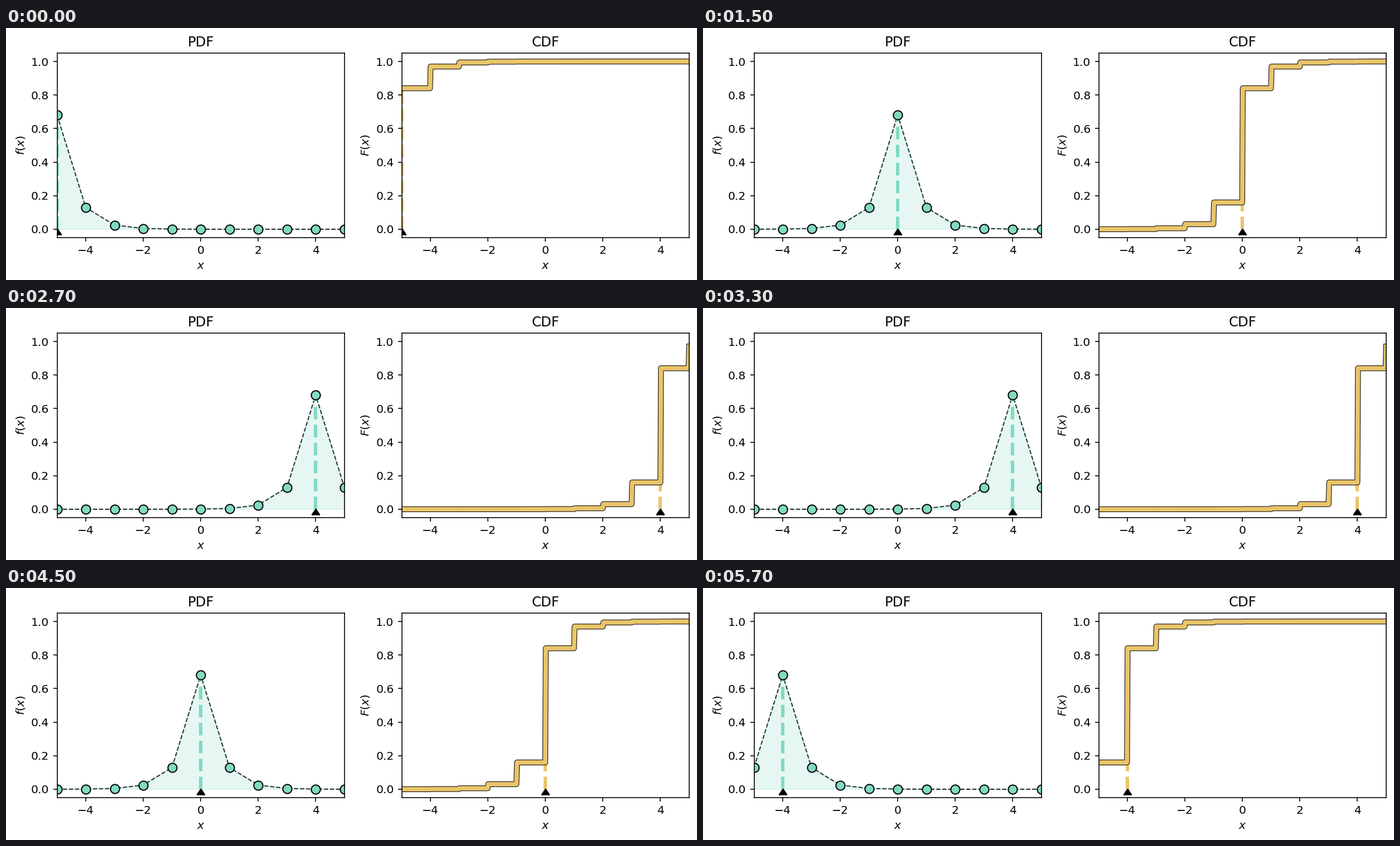
These frames come from a looping animation (1239x452 px, 6000 ms). A matplotlib script:

```python
import numpy as np
import matplotlib.pyplot as plt
from matplotlib.animation import FuncAnimation

W, H, DPI = 1239, 452, 146
TEAL, GOLD = "#82dac3", "#e9c46a"
P = 0.19  # decay of the discrete Laplace distribution
FRAMES, INTERVAL = 20, 300

plt.rcParams["font.family"] = "DejaVu Sans"


def pdf(k, mu):
    return (1 - P) / (1 + P) * P ** np.abs(k - mu)


def cdf(x, mu):
    d = np.floor(x - mu)
    tail = P ** np.where(d < 0, -d, d + 1) / (1 + P)
    return np.where(d < 0, tail, 1 - tail)


def make_axes(left, title, ylabel):
    ax = fig.add_axes([left / W, 1 - 376 / H, 515.3 / W, 331 / H])
    ax.set(xlim=(-5, 5), ylim=(-0.05, 1.05), title=title,
           xlabel="$x$", ylabel=ylabel)
    ax.set_xticks(range(-4, 5, 2))
    ax.set_yticks(np.arange(6) / 5)
    return ax


def make_stem(ax, color):
    return ax.plot([], [], color=color, lw=3, ls="--", zorder=1.9)[0]


def make_caret(ax):
    return ax.scatter([0], [0], s=45, marker=6, color="black",
                      linewidths=1.5, zorder=2.4)


fig = plt.figure(figsize=((W + 1e-6) / DPI, (H + 1e-6) / DPI), dpi=DPI,
                 facecolor="white")
ax_pdf = make_axes(91.5, "PDF", "$f(x)$")
ax_cdf = make_axes(709.7, "CDF", "$F(x)$")

ks = np.arange(-5, 6)
xs = np.linspace(-5, 5, 500)

outline, = ax_pdf.plot([], [], color="black", lw=1, ls="--", zorder=1.7)
area, = ax_pdf.fill([0, 0, 0], [0, 0, 0], color=TEAL, alpha=0.2, lw=1,
                    zorder=1.8)
dots, = ax_pdf.plot([], [], "o", ms=8, mfc=TEAL, mec="black", mew=1,
                    zorder=2.2)
steps = [ax_cdf.plot([], [], color=c, lw=w, solid_joinstyle="round",
                     zorder=2)[0]
         for c, w in (("black", 5), (GOLD, 4))]
stems = [make_stem(ax_pdf, TEAL), make_stem(ax_cdf, GOLD)]
carets = [make_caret(ax_pdf), make_caret(ax_cdf)]


def update(i):
    mu = 5 - abs(i - 10)
    f = pdf(ks, mu)
    outline.set_data(ks, f)
    dots.set_data(ks, f)
    area.set_xy(np.column_stack([np.r_[-5, ks, 5], np.r_[0, f, 0]]))
    for line in steps:
        line.set_data(xs, cdf(xs, mu))
    for stem, top in zip(stems, (pdf(mu, mu), cdf(mu, mu))):
        stem.set_data([mu, mu], [0, top])
    for caret in carets:
        caret.set_offsets([[mu, 0]])
    return [outline, area, dots, *steps, *stems, *carets]


anim = FuncAnimation(fig, update, frames=FRAMES, interval=INTERVAL,
                     repeat=True, repeat_delay=0, blit=False)
plt.show()
```
